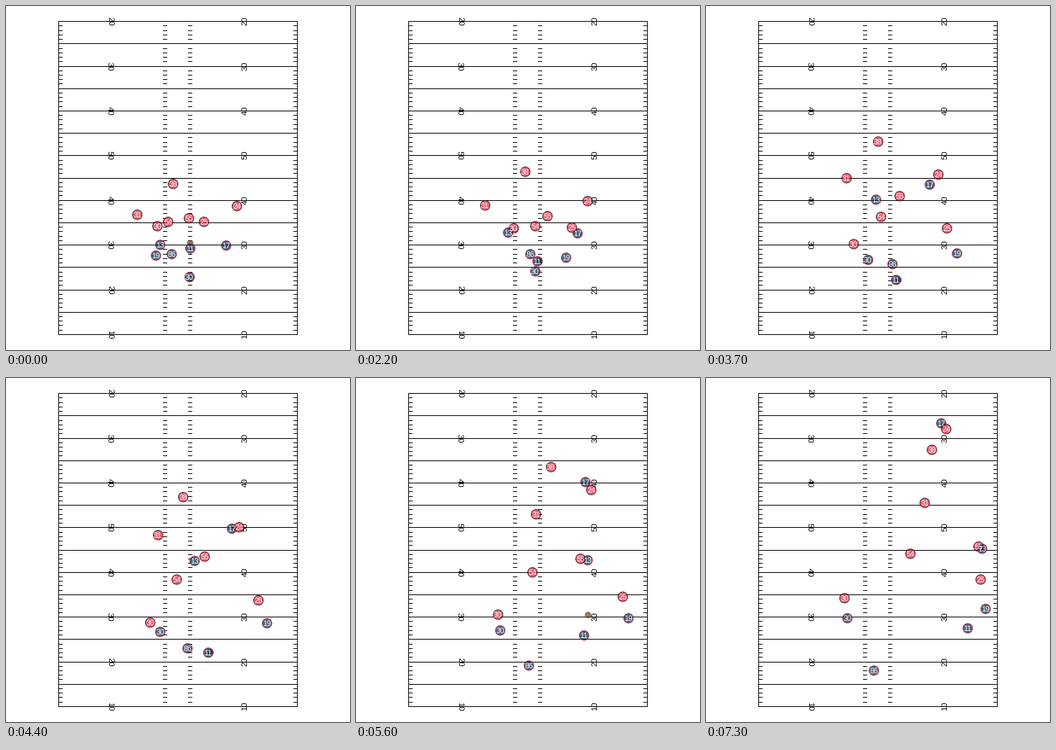
A matplotlib script that plays this animation: 480 by 480 pixels, repeating every 7400 ms.

```python
import numpy as np
import matplotlib.pyplot as plt
from matplotlib.animation import FuncAnimation
from matplotlib.colors import to_rgba
from matplotlib.patches import Circle

SIZE, DPI, FRAMES, STEP = 480, 96, 74, 100
PX = 72 / DPI
LEFT, RIGHT, TOP, YARD = 73, 406, 21.1, 6.24
ALPHA = 0.7
SNAP, THROW, CATCH, LAST = 14, 53, 63, FRAMES - 1
COLORS = {"red": ("#e31837", "black"), "blue": ("#002244", "#c60c30")}

plt.rcParams["font.family"] = "Liberation Sans"
plt.rcParams["text.hinting"] = "none"


class Player:
    """Drifts evenly until the snap, then runs a smooth route whose stops
    are evenly spread over the rest of the play."""

    def __init__(self, number, team, start, drift, *stops):
        self.number, self.team = number, team
        self.start, self.drift = np.array(start, float), np.array(drift, float)
        self.knots = np.vstack([self.start + self.drift, stops])
        self.gap = (LAST - SNAP) / len(stops)
        inner = (self.knots[2:] - self.knots[:-2]) / 2
        self.slopes = np.vstack([self.drift / SNAP * self.gap, inner,
                                 self.knots[-1] - self.knots[-2]])

    def at(self, i):
        if i <= SNAP:
            return self.start + self.drift * i / SNAP
        k = min(int((i - SNAP) / self.gap), len(self.knots) - 2)
        u = (i - SNAP) / self.gap - k
        ease = u * u * (3 - 2 * u)
        return ((1 - ease) * self.knots[k] + ease * self.knots[k + 1]
                + u * (1 - u) ** 2 * self.slopes[k]
                - u * u * (1 - u) * self.slopes[k + 1])


passer = Player(11, "blue", (257, 338), (0, 2),
                (252, 373), (281, 383), (325, 356), (365, 349))
catcher = Player(13, "blue", (215, 333), (0, -1),
                 (216, 294), (261, 256), (333, 253), (385, 238))

# in drawing order
players = [
    Player(38, "red", (233, 248), (2, -5),
           (237, 214), (246, 168), (277, 118), (315, 100)),
    Player(31, "red", (183, 291), (-1, -4),
           (183, 264), (211, 220), (258, 186), (305, 174)),
    Player(30, "red", (211, 307), (11, 0),
           (213, 317), (201, 341), (197, 327), (193, 307)),
    Player(54, "red", (226, 301), (16, 1),
           (253, 308), (238, 282), (249, 268), (285, 245)),
    Player(55, "red", (255, 296), (10, 0),
           (268, 286), (276, 250), (321, 252), (380, 235)),
    Player(25, "red", (276, 301), (12, 6), (329, 310), (369, 307), (383, 281)),
    Player(86, "blue", (231, 346), (2, 0), (260, 354), (243, 398), (234, 408)),
    passer,
    Player(19, "blue", (209, 348), (50, 4), (341, 346), (377, 337), (390, 322)),
    Player(30, "blue", (256, 378), (0, -1), (231, 355), (203, 354), (197, 335)),
    catcher,
    Player(17, "blue", (307, 334), (1, -1), (311, 265), (319, 158), (328, 63)),
    Player(24, "red", (322, 279), (1, 0), (324, 245), (327, 168), (335, 71)),
]


def ball_at(i):
    spot, hand = np.array([257, 331]), np.array([3, 0])
    if i < SNAP + 3:
        pull = max(i - SNAP, 0) / 3
        return spot + (passer.at(i) + hand - spot) * pull
    if i <= THROW:
        return passer.at(i) + hand
    if i < CATCH:
        start = passer.at(THROW) + hand
        return start + (catcher.at(CATCH) - start) * (i - THROW) / (CATCH - THROW)
    return catcher.at(i)


fig = plt.figure(figsize=(SIZE / DPI, SIZE / DPI), dpi=DPI, facecolor="white")
ax = fig.add_axes([0, 0, 1, 1])
ax.set(xlim=(0, SIZE), ylim=(SIZE, 0))
ax.axis("off")


def line(xs, ys):
    ax.plot(xs, ys, color="black", lw=PX, snap=False,
            solid_capstyle="butt", zorder=1)


def draw_field():
    for yard in range(71):
        y = round(TOP + yard * YARD)
        if yard % 5 == 0:
            line([LEFT, RIGHT + 1], [y + 0.5] * 2)
        else:
            for x in (LEFT, 219, 254, RIGHT - 5):
                line([x, x + 6], [y + 0.5] * 2)
        if yard % 10 == 0:
            label = 50 - abs(30 - yard)
            for x, turn in ((145, 270), (333.5, 90)):
                ax.text(x, y, label, rotation=turn, fontsize=11.4 * PX,
                        ha="center", va="center", zorder=2)
    for x in (LEFT, RIGHT):
        line([x + 0.5] * 2, [21, 459])


def dot(radius, fill, edge, lw, z):
    return ax.add_patch(Circle((0, 0), radius, fc=to_rgba(fill, ALPHA),
                               ec=edge, lw=lw, zorder=z))


draw_field()
ball = dot(4.6, "#654321", "none", 0, 3)
dots, numbers = [], []
for n, p in enumerate(players):
    fill, edge = COLORS[p.team]
    dots.append(dot(6.75, fill, to_rgba(edge, ALPHA), PX, 4 + n))
    numbers.append(ax.text(0, 0, p.number, color="white", fontsize=10.6 * PX,
                           ha="center", va="baseline", zorder=30))


def update(i):
    ball.center = tuple(ball_at(i))
    for mark, text, p in zip(dots, numbers, players):
        x, y = np.round(p.at(i))
        mark.center = (x + 0.25, y + 0.25)
        text.set_position((x, y + 4))
    return [ball, *dots, *numbers]


anim = FuncAnimation(fig, update, frames=FRAMES, interval=STEP,
                     repeat=True, repeat_delay=0)
plt.show()
```
